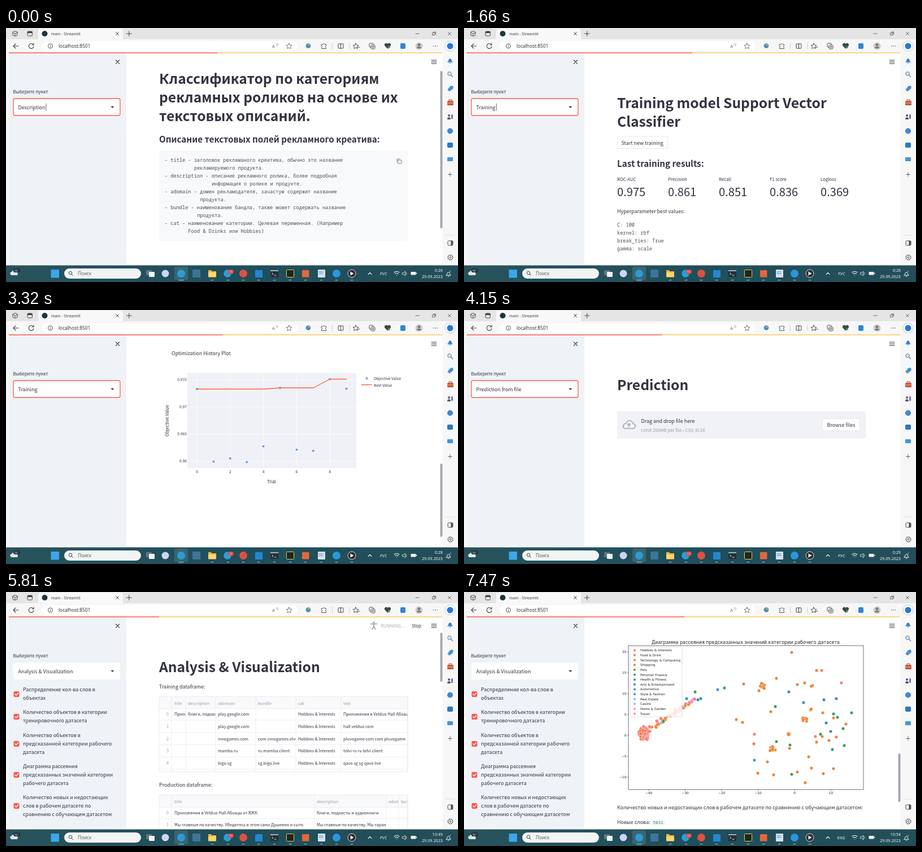
An HTML page for the animation above (8300 ms loop, 800x450 px).

```html
<!DOCTYPE html>
<html lang="ru">
<head>
<meta charset="utf-8">
<title>main</title>
<style>
html, body { margin: 0; width: 100%; height: 100%; overflow: hidden; background: #f7f7f7; }
svg { display: block; }
#stage { width: 100vw; height: 100vh; }
text { fill: #31333f; white-space: pre; }
.st { font-family: "Noto Sans CJK JP", "Noto Sans CJK SC", "Noto Sans CJK KR", "Noto Sans CJK", sans-serif; }
.ui { font-family: "Open Sans", "Noto Sans", sans-serif; }
.dj { font-family: "DejaVu Sans", sans-serif; }
.mono { font-family: "Noto Sans Mono", monospace; }
</style>
</head>
<body>
<svg id="stage" viewBox="0 0 800 450"></svg>
<script>
const STEP = 830;
const INK = '#31333f', GRAY = '#9b9da6', LINE = '#e6e8ec', RED = '#ff5a50', ORANGE = '#ee7f2f';
const FONT_SCALE = { st: .895, mono: .985 };

const esc = s => String(s).replace(/&/g, '&amp;').replace(/</g, '&lt;');
const text = (x, y, s, size = 10, { f = 'st', c = INK, w = 400, a = 'start', extra = '' } = {}) =>
  `<text class="${f}" x="${x}" y="${y}" font-size="${(size * (FONT_SCALE[f] || 1)).toFixed(2)}" font-weight="${w}" text-anchor="${a}" style="fill:${c}" ${extra}>${esc(s)}</text>`;
const rect = (x, y, w, h, fill, r = 0, extra = '') =>
  `<rect x="${x}" y="${y}" width="${w}" height="${h}" rx="${r}" fill="${fill}" ${extra}/>`;
const dot = (x, y, r, fill, extra = '') => `<circle cx="${x}" cy="${y}" r="${r}" fill="${fill}" ${extra}/>`;
const path = (d, c = '#333', w = 1, fill = 'none') =>
  `<path d="${d}" stroke="${c}" stroke-width="${w}" fill="${fill}" stroke-linecap="round" stroke-linejoin="round"/>`;
const clip = (x, y, w, h, body) =>
  `<svg x="${x}" y="${y}" width="${w}" height="${h}" viewBox="${x} ${y} ${w} ${h}">${body}</svg>`;
const lines = (rows, x, y, step, size, o) => rows.map((s, i) => text(x, y + i * step, s, size, o)).join('');
const h1 = (...rows) => lines(rows, 271, 142, 33, 27.5, { w: 700 });
const frame = (x, y, w, h, c = '#333', sw = .7) => rect(x, y, w, h, 'none', 0, `stroke="${c}" stroke-width="${sw}"`);
const upright = (x, y, s, size, f) =>
  text(0, 0, s, size, { f, a: 'middle', extra: `transform="translate(${x} ${y}) rotate(-90)"` });

let seed = 7;
const rnd = () => (seed = seed * 16807 % 2147483647) / 2147483647;
const gauss = () => (rnd() + rnd() + rnd() - 1.5) * 1.4;

function browser() {
  const icon = '#444';
  let s = rect(0, 0, 800, 450, '#f7f7f7') + rect(0, 0, 800, 20, '#e5e5e5')
    + path('M57 20V5q0-4 4-4H203q4 0 4 4V20z', 'none', 0, '#f8f8f8')
    + rect(12, 6, 8, 8, 'none', 2.5, `stroke="${icon}"`) + path('M12 8l4 2 5-2M16 10v4', icon, .8)
    + rect(38, 6, 8.5, 8, 'none', 1.5, `stroke="${icon}"`) + rect(38, 6, 8.5, 3, icon)
    + dot(68.5, 10, 5, '#20343c') + text(80, 12.5, 'main - Streamlit', 7, { f: 'ui' })
    + path('M194.500 7.500l5 5m0-5l-5 5M213.500 10h8.500m-4.200-4.200v8.500', icon)
    + path('M725 10h6M782.500 7.500l5 5m0-5l-5 5M755 8.500h4v4h-4zM756.500 7h4v4', icon, .8)
    + path('M22 32h-9m4-4l-4 4l4 4', icon, 1.1) + path('M48 29a4.400 4.400 0 1 0 1 4M49 27v3h-3', icon, 1.1)
    + rect(63, 23.5, 453, 17, '#fff', 8.5)
    + dot(78.5, 32, 4, 'none', 'stroke="#555"') + path('M78.500 31.500v2.500M78.500 29.800v.1', '#555')
    + text(93, 35, 'localhost:8501', 8.35, { f: 'ui', c: '#222' })
    + text(471, 35, 'A', 8, { f: 'ui', c: '#666' }) + path('M478 28q2 1 0 3m2-4q3 2 0 5', '#666', .6);
  const star = (x, c) => path(`M${x} 27l1.500 3.300 3.500.400-2.600 2.400.700 3.500-3.100-1.800-3.100 1.800.700-3.500-2.600-2.400 3.500-.400z`, c, .9);
  s += star(501, '#666') + dot(535, 31.5, 4.3, '#3b8fc4') + dot(536, 30, 1.8, '#e89b45')
    + path('M558.500 29h2.500q1.500-3 3 0h2.500v2.500q-3 1.500 0 3v2h-8v-2.500q3-1 0-2.500z', icon, .9)
    + path('M577.500 27v10M608 27v10', '#bbb', .7)
    + rect(588, 28, 9, 8, 'none', 1, `stroke="${icon}"`) + path('M592.500 28v8', icon)
    + star(619, icon) + path('M622 34h4', icon)
    + rect(643, 27, 7, 7, 'none', 1.5, `stroke="${icon}"`) + rect(646, 30, 7, 7, '#f7f7f7', 1.5, `stroke="${icon}"`) + path('M649.500 31.500v4m-2-2h4', icon, .8)
    + path('M675.500 36q-8-6-4-8.500q3-1 4 1q1-2 4-1q4 2.500-4 8.500z', icon, 1, '#444') + dot(678, 34, 2, '#3ba268')
    + rect(698, 27, 9, 10, '#2f86d2', 2) + dot(731, 32, 6.5, '#c9c9c9') + dot(731, 30, 2.4, '#777') + path('M727 36q0-3 4-3t4 3z', 'none', 0, '#777')
    + path('M756.500 32h.1m3.200 0h.1m3.200 0h.1', icon, 1.4);
  // right rail
  s += dot(786, 32, 9, '#fff', 'stroke="#b9cbe5"') + dot(786, 32, 5.5, '#2877d5')
    + path('M782 60q2-1 2-4q2-3 4 0q0 3 2 4zM785 62h2', '#2f7fd8', 1, '#2f7fd8')
    + dot(785, 81, 3.3, '#d5e5f2', 'stroke="#647b90"') + path('M787.500 83.500l3 3', '#647b90', 1.4)
    + path('M782 109l5-6h4v4l-6 5z', '#3d8fdd', 1, '#3d8fdd')
    + rect(781, 129, 11, 8, '#c9573e', 1.5) + path('M784 129v-2h5v2', '#9c4431') + rect(781, 132, 11, 1.5, '#ec9a58')
    + dot(784, 155, 2, '#555b70') + path('M781 162q0-4 3-4t3 4z', 'none', 0, '#555b70') + rect(788, 153, 3, 8, '#7c6bc0', 1)
    + dot(786, 182.5, 5, '#4087d4') + rect(781, 203, 10, 9, '#2879c8', 2) + rect(781, 229, 10, 7, '#3f98dc', 1)
    + path('M782.500 259.500h7m-3.500-3.500v7', '#555', .9) + path('M778 367h16', '#ddd')
    + rect(782, 377, 9, 8, 'none', 1.5, `stroke="${icon}"`) + rect(787.5, 377, 3, 8, icon)
    + dot(786.5, 406.5, 4.3, 'none', `stroke="${icon}" stroke-width="1.4" stroke-dasharray="2.3 1"`) + dot(786.5, 406.5, 1.5, 'none', `stroke="${icon}"`);
  return s;
}

function taskbar() {
  const pale = '#eef4f5';
  let s = `<linearGradient id="bar"><stop stop-color="#28535d"/><stop offset=".5" stop-color="#1f4f5b"/><stop offset="1" stop-color="#234e59"/></linearGradient>`
    + rect(0, 420.5, 800, 29.5, 'url(#bar)')
    + path('M9 438q-4-5 1-6q3-5 7 0q6 1 3 6z', 'none', 0, '#dfe7ec') + rect(13, 426, 12, 7, '#20323a', 3) + text(14.5, 431.5, '16°', 5, { f: 'ui', c: '#fff' })
    + rect(79.5, 428, 14.5, 14.5, '#3ba7ea', 1)
    + rect(103, 426, 136, 18, '#f0f4f5', 9) + dot(114, 434, 2.8, 'none', 'stroke="#444"') + path('M116 436l2.500 2.500', '#444')
    + text(127, 438, 'Поиск', 8.2, { f: 'ui', c: '#555' })
    + rect(248, 429, 10, 9, '#66757c', 1) + rect(253, 432, 10, 9, '#eef1f2', 1)
    + dot(282, 435, 6.5, '#cdd5f3')
    + rect(298, 422.5, 24, 24, '#3a6570', 3) + dot(310, 435, 7, '#2c9bd5') + rect(305, 446, 10, 1.5, '#54bde5', .7)
    + rect(330, 428, 14, 14, '#3d7598', 1)
    + path('M358 429h5l1.500 2H372v10h-14z', 'none', 0, '#f0b53c') + rect(358, 433, 14, 8.5, '#ffd668', 1)
    + dot(392, 435, 6.7, '#2b9fdc') + rect(393, 428, 10, 7.5, '#e0483f', 3.7) + text(398, 433.8, '11', 5.5, { f: 'ui', c: '#fff', a: 'middle' })
    + dot(420, 435, 7, '#df513f') + rect(441, 429, 13, 13, '#2586d0', 1)
    + rect(468, 429, 14, 12, '#242f3b', 1) + rect(468, 429, 14, 2, '#a6b1ba') + path('M471 434l2 1.500-2 1.500m4 1h3', pale, .9)
    + rect(496.5, 428.5, 13, 13, '#1f251f', 1, 'stroke="#d9d456"')
    + rect(524, 429, 12.5, 12.5, '#e4673c', 1) + rect(552, 428, 13, 14, '#d4e2f4', 1) + path('M554 432h7m-7 3h7', '#597fb9')
    + dot(585, 435, 7, '#2997df') + dot(612, 435, 7, '#2b2d3a', 'stroke="#f1d8cf"') + path('M610 432l5 3-5 3z', '#fff', .5, '#fff');
  for (const x of [365, 393, 420, 447, 475, 503, 530, 558, 585, 612]) s += rect(x - 2.5, 446, 5, 1.3, '#9aacb2', .6);
  s += path('M641 436.500l3-3 3 3', pale, 1.1)
    + path('M687 433q4.500-3.500 9 0M688.800 435.500q2.700-2 5.400 0M691.500 438v.1', pale, 1.2)
    + path('M702 433.500h2l2.500-2.500v8l-2.500-2.500h-2zM708.500 433q1.500 2 0 4', pale, .8)
    + rect(716.5, 432, 9, 5.5, pale, 1) + rect(726, 433.5, 1.2, 2.5, pale)
    + path('M779 438q2-1 2-4q2-3 4 0q0 3 2 4zM782 440h2', pale, 1) + text(785, 432.5, 'z', 5, { f: 'ui', c: pale });
  return s;
}

function description() {
  const rows = [[0, '- title - заголовок рекламаного креатива, обычно это название'], [10, 'рекламируемого продукта.'],
    [0, '- description - описание рекламного ролика, более подробная'], [16, 'информация о ролике и продукте.'],
    [0, '- adomain - домен рекламодателя, зачастую содержит название'], [12, 'продукта.'],
    [0, '- bundle - наименование бандла, также может содержать название'], [11, 'продукта.'],
    [0, '- cat - наименование категории. Целевая переменная. (Например'], [8, 'Food & Drinks или Hobbies)']];
  return lines(['Классификатор по категориям', 'рекламных роликов на основе их', 'текстовых описаний.'], 271, 98.5, 33, 27.5, { w: 700 })
    + text(271, 203, 'Описание текстовых полей рекламного креатива:', 17, { w: 600 })
    + rect(271, 217, 440, 160, '#f8f9fb', 3)
    + rows.map(([n, s], i) => text(281 + n * 5.2, 237 + i * 14, s, 8.75, { f: 'mono', c: '#4b4d58' })).join('')
    + path('M692 237v-5h5M694 234h6v6h-6z', '#777', .9);
}

function plot() {
  let s = text(293, 80, 'Optimization History Plot') + rect(321, 111.5, 299, 168.5, '#eff1f6');
  for (let i = 0; i < 5; i++) {
    const x = 338 + i * 58.8;
    s += path(`M${x} 111.500V280`, '#fff', .7) + text(x, 289, i * 2, 7.5, { a: 'middle' });
  }
  ['0.975', '0.97', '0.965', '0.96'].forEach((v, i) => {
    const y = 123.5 + i * 48.1;
    s += path(`M321 ${y}H620`, '#fff', .7) + text(320, y + 2.6, v, 7.5, { a: 'end' });
  });
  const best = '#ff5f49', blue = '#6a9fea';
  [140, 268.5, 263, 269.5, 241.5, 138, 247.5, 249.5, 122.5, 139.5].forEach((y, i) => s += dot(338 + i * 29.4, y, 2, blue));
  return s + path('M338 140H456L485 138H544L573 122.500H602.500', best, 1.4)
    + text(470, 306.5, 'Trial', 8.75, { a: 'middle' }) + upright(288, 196, 'Objective Value', 8.75, 'st')
    + dot(638.5, 121, 2, blue) + text(651, 124, 'Objective Value', 7.5)
    + path('M629.500 132.500h18', best, 1.4) + text(651, 135.5, 'Best Value', 7.5);
}

function training() {
  const metrics = { 'ROC-AUC': '0.975', Precision: '0.861', Recall: '0.851', 'F1 score': '0.836', Logloss: '0.369' };
  return h1('Training model Support Vector', 'Classifier')
    + rect(271, 192, 89.5, 21.5, '#fff', 1.5, 'stroke="#dcdde1" stroke-width=".7"') + text(278.5, 206.5, 'Start new training')
    + text(271, 246, 'Last training results:', 17, { w: 600 })
    + Object.entries(metrics).map(([k, v], i) => text(271 + i * 90, 271, k, 8.75) + text(271 + i * 90, 298, v, 22.5)).join('')
    + text(271, 327.5, 'Hyperparameter best values:')
    + lines(['C: 100', 'kernel: rbf', 'break_ties: True', 'gamma: scale'], 271, 352, 14, 8.75, { f: 'mono', c: '#4b4d58' });
}

// cols: left edges, the last one is the right edge; rows: cells after the index
function table(y, height, cols, heads, rows, inset = [5, 4, 4, 4, 4, 4]) {
  const right = cols.at(-1), first = y + 31;
  let s = rect(271, y, right - 271, 22, '#f8f9fb');
  const cell = (c, base, v, color) => v
    ? clip(cols[c], base - 10, cols[c + 1] - cols[c], 14, text(cols[c] + inset[c], base, v, 8.125, { c: color })) : '';
  heads.forEach((v, c) => s += cell(c, y + 14.5, v, GRAY));
  rows.forEach((row, r) => {
    const mid = first + r * 21.75;
    s += text(288, mid + 3, r, 8.125, { c: GRAY, a: 'end' }) + path(`M271 ${mid + 11}H${right}`, LINE, .7);
    row.forEach((v, c) => s += cell(c, mid + 3, v, INK));
  });
  cols.forEach(x => s += path(`M${x} ${y}V${y + height}`, LINE, .7));
  return s + path(`M271 ${y + 22}H${right}`, LINE, .7) + frame(271, y, right - 271, height, LINE, .8);
}

const books = 'Книги, подкасты и аудиокниги', quality = 'Мы главные по качеству.', hob = 'Hobbies & Interests';

function uploader() {
  return h1('Prediction') + rect(271, 179, 440, 48.5, '#f0f2f6', 3)
    + path('M285 210q-4-1-3-5t5-4q2-5 6-5t6 5q5 1 4 6q-1 3-4 3zM292 207v-6m-2.500 2.500l2.500-2.500 2.500 2.500', '#a3a8b8', 1.7)
    + text(313.5, 200, 'Drag and drop file here') + text(313.5, 215.5, 'Limit 200MB per file • CSV, XLSX', 8.75, { c: GRAY })
    + rect(634.5, 192.5, 66, 21.5, '#fff', 2, 'stroke="#dfe0e4" stroke-width=".7"') + text(667.5, 206.8, 'Browse files', 10, { a: 'middle' });
}

function prediction() {
  return uploader() + text(271, 249, 'Last prediction results:')
    + table(264, 134, [293, 455, 582, 604, 626, 708], ['', 'description', 'adomain', 'bundle', 'predict'], [
      ['Hall Абзацы от ВЖК', books, '', '', hob],
      ['ву. Убедитесь в этом сами Душевно и сыто', quality + ' Мы гарантируем', '', '', 'Food & Drink'],
      ['elduo Hall', 'Pizza delivery takeaway', '', '', hob],
      ['а продуктов на дом, купить продукты питания', 'pageMetaDescription', '', '', 'Food & Drink'],
      ['оставка продуктов', 'Читайте отзывы, сравнивайте обзоры', '', '', 'Food & Drink']], [0, 4, 5, 5, 5])
    + '<linearGradient id="shade"><stop stop-color="#888" stop-opacity=".4"/><stop offset="1" stop-color="#888" stop-opacity="0"/></linearGradient>'
    + rect(293, 264, 6, 130, 'url(#shade)');
}

function dataframes() {
  const app = 'Приложения в Velduo Hall Абзацы от ВЖК';
  return h1('Analysis & Visualization') + text(271, 170.5, 'Training dataframe:')
    + table(185, 133.5, [293, 318, 371, 442, 513, 593, 711], ['title', 'description', 'adomain', 'bundle', 'cat', 'text'], [
      [app, books, 'play.google.com', '', hob, app],
      ['', '', 'play.google.com', '', hob, 'hall velduo com'],
      ['', '', 'innogames.com', 'com.innogames.elvenar', hob, 'pluvogame com com pluvogame'],
      ['', '', 'mamba.ru', 'ru.mamba.client', hob, 'tolvi ru ru tolvi client'],
      ['', '', 'bigo.sg', 'sg.bigo.live', hob, 'qavo sg sg qavo live']])
    + text(271, 344.5, 'Production dataframe:')
    + table(359.5, 100, [293, 546, 673, 695, 711], ['title', 'description', 'adomain', 'bundle'], [
      [app, books], [quality + ' Убедитесь в этом сами Душевно и сыто', quality + ' Мы гарантируем']]);
}

function charts() {
  const dj = { f: 'dj', c: '#222' }, mid = { ...dj, a: 'middle' }, end = { ...dj, a: 'end' };
  let s = text(501, 80, 'Распределение кол-ва слов в объектах', 6.94, mid);
  const counts = [240, 128, 240, 345, 673, 370, 140, 108, 104, 56, 30, 12, 4, 2, 6, 3, 1, 5, 2];
  counts.forEach((n, i) => s += rect(313 + i * 9.45, 274 - n * .27, 9.55, n * .27, '#1f77b4'));
  s += rect(661, 273.2, 9.5, .8, '#1f77b4') + frame(294, 83, 414, 191);
  for (let i = 0; i < 8; i++) {
    const x = 311 + i * 52.75, y = 274 - i * 27;
    s += path(`M${x} 274v2M294 ${y}h-2`, '#333', .6) + text(x, 282, i * 25, 5.3, mid) + text(291, y + 2, i * 100, 5.3, end);
  }
  s += upright(278.5, 178.5, 'Кол-во объектов', 4.9, 'dj') + text(501, 289, 'Кол-во слов в объекте', 4.8, mid)
    + path('M727 79l-3-3m0 2.500v-2.500h2.500M729 81l3 3m0-2.500v2.500h-2.500', '#777', 1)
    + text(532, 313, 'Количество объектов в категории тренировочного датасета', 8.32, mid);
  [[hob, 48.9, '#e994a4'], ['Personal Finance', 9.7, '#eb946a'], ['Food & Drink', 9.6, '#c3973f'], ['Arts & Entertainment', 7.1, '#a5a047'],
    ['Health & Fitness', 6.5, '#83a84c'], ['Technology & Computing', 4.4, '#4fae50'], ['Shopping', 2.6, '#4ba69f'],
    ['Casino', 2.3, '#4aa4ad'], ['Style & Fashion', 2.1, '#4ba2b6']].forEach(([name, v, c], i) => {
    const y = 321 + i * 11.55;
    s += rect(357, y - 4.65, v * 6.81, 9.3, c) + path(`M357 ${y}h-2`, '#333', .6)
      + text(354, y + 2.2, name, 5.78, end) + text(358 + v * 6.81, y + 2.2, v + '%', 5.8, dj);
  });
  return s + frame(357, 315, 351, 140) + upright(279.5, 396.5, 'Категория', 5.8, 'dj');
}

function scatter() {
  const PINK = '#fb7672', GREEN = '#359a55', TEAL = '#2f8fa6', BLUE = '#3f8fe0';
  const dj = { f: 'dj', c: '#222' };
  const mark = (x, y, c) => dot(x.toFixed(1), y.toFixed(1), 2.7, c, 'stroke="#fff" stroke-width=".4"');
  const pick = list => list[Math.floor(rnd() * list.length)];
  let s = text(498.5, 92, 'Диаграмма рассеяния предсказанных значений категории рабочего датасета', 8, { ...dj, a: 'middle' });
  for (let i = 0; i < 70; i++) {
    const t = rnd() ** 1.5;
    s += mark(322 + t * 86 + gauss() * 2, 247 - t * 57 + gauss() * 4 * (1.2 - t), pick([PINK, PINK, ORANGE, ORANGE, '#c9a0e8']));
  }
  for (let i = 0; i < 110; i++) s += mark(318.5 + gauss() * 5, 250 + gauss() * 6.5, pick([PINK, PINK, PINK, PINK, PINK, ORANGE]));
  for (const [x, y, n, spread] of [[529, 166, 9, 3], [546, 278, 12, 3], [601, 227, 8, 3], [575, 252, 4, 2], [613, 207, 3, 2.5], [615, 167, 2, 1.5]])
    for (let i = 0; i < n; i++) s += mark(x + gauss() * spread, y + gauss() * spread, ORANGE);
  const groups = [
    [ORANGE, [580, 107, 495, 163, 553, 153, 590, 164, 603, 161, 624, 139, 482, 226, 493, 231, 543, 212, 635, 214, 676, 234,
      513, 269, 537, 301, 520, 321, 548, 324, 590, 319, 604, 338, 615, 312, 610, 292, 636, 322, 654, 313, 624, 266, 646, 263,
      659, 257, 654, 223, 576, 277, 522, 175, 634, 256]],
    [PINK, [633, 139, 668, 161, 514, 252, 622, 256]],
    [GREEN, [409, 177, 551, 203, 654, 216, 661, 222, 686, 214, 553, 265, 577, 271, 580, 323, 673, 272, 631, 252, 671, 242, 353, 229]],
    [TEAL, [461, 170, 575, 177, 601, 196, 637, 191, 659, 189, 641, 232, 649, 247, 652, 279, 419, 189, 394, 189, 414, 191]],
    [BLUE, [449, 173, 514, 298]]];
  for (const [c, p] of groups) for (let i = 0; i < p.length; i += 2) s += mark(p[i], p[i + 1], c);
  s += rect(294, 97.5, 92, 123.5, '#fff', 1.5, 'fill-opacity=".8" stroke="#ccc" stroke-width=".6"');
  [[hob, PINK], ['Food & Drink', ORANGE], ['Technology & Computing', ORANGE], ['Shopping', '#dd8a2c'], ['Pets', '#5a9a3a'],
    ['Personal Finance', GREEN], ['Health & Fitness', TEAL], ['Arts & Entertainment', '#2c90b0'], ['Automotive', '#2f90b8'],
    ['Style & Fashion', BLUE], ['Real Estate', '#7ab5f5'], ['Casino', '#c9a0f0'], ['Home & Garden', '#ff8f98'], ['Travel', '#fb8a88']]
    .forEach(([name, c], i) => s += dot(302, 103.3 + i * 8.64, 2, c) + text(312, 105.3 + i * 8.64, name, 5.7, dj));
  s += frame(291, 95, 416, 255);
  for (let v = -10; v <= 20; v += 5) {
    const y = 254 - v * 7.4;
    s += path(`M291 ${y}h-2`, '#333', .6) + text(287.5, y + 2.1, String(v).replace('-', '−'), 5.8, { ...dj, a: 'end' });
  }
  for (let v = -40; v <= 10; v += 10) {
    const x = 585 + v * 6.45;
    s += path(`M${x} 350v2`, '#333', .6) + text(x, 358, String(v).replace('-', '−'), 5.8, { ...dj, a: 'middle' });
  }
  return s + text(271, 384.5, 'Количество новых и недостающих слов в рабочем датасете по сравнению с обучающим датасетом:')
    + text(271, 411, 'Новые слова:') + rect(331, 402, 25, 13, '#f6f8f9', 2) + text(334, 411, '5032', 7.9, { f: 'mono', c: '#2f8a5b' });
}

function checkboxes() {
  return [[180, ['Распределение кол-ва слов в', 'объектах']], [220, ['Количество объектов в категории', 'тренировочного датасета']],
    [268, ['Количество объектов в', 'предсказанной категории рабочего', 'датасета']],
    [323, ['Диаграмма рассеяния', 'предсказанных значений категории', 'рабочего датасета']],
    [378, ['Количество новых и недостающих', 'слов в рабочем датасете по', 'сравнению с обучающим датасетом']]]
    .map(([y, rows]) => rect(13.5, y - 4, 10, 10, '#fb5650', 2) + path(`M16 ${y + 1}l2 2 3.500-4`, '#fff', 1.3)
      + lines(rows, 30, y + 11 - rows.length * 7.5, 15, 10)).join('');
}

const RUNNER = 'M651 56v5l-3 5m3-5l3 5M645.500 56.500h11', SWIMMER = 'M646 56l5-1 4 4M645 62q2-2 4 0t4 0 4 0M645 65q2-2 4 0t4 0 4 0';
const ANALYSIS = 'Analysis & Visualization';
const trainingPage = training();
const scenes = [
  { menu: 'Description', caret: 71, body: description(), thumb: [76, 355], split: 374, time: '0:26' },
  { menu: 'Description', body: description(), scroll: 62, thumb: [124, 403], split: 374, time: '0:26' },
  { menu: 'Training', caret: 57.5, body: trainingPage, split: 404, time: '0:28' },
  { menu: 'Training', body: trainingPage + `<g transform="translate(0 565)">${plot()}</g>`, scroll: 280, thumb: [170, 300], split: 390, time: '0:28' },
  { menu: 'Training', body: plot(), thumb: [272, 402], split: 383, time: '0:28' },
  { menu: 'Prediction from file', body: uploader(), split: 350, time: '0:29' },
  { menu: 'Prediction from file', body: prediction(), thumb: [72, 333], split: 331, time: '0:29' },
  { menu: ANALYSIS, body: dataframes(), thumb: [72, 159], split: 271, time: '10:49', run: RUNNER },
  { menu: ANALYSIS, body: charts(), thumb: [178, 292], split: 370, time: '10:50', run: SWIMMER, lang: 'ENG' },
  { menu: ANALYSIS, body: scatter(), thumb: [286, 372], split: 390, time: '10:54', lang: 'ENG' },
];

function scene({ menu, caret, body, scroll = 0, thumb, split, time, run, lang = 'РУС' }) {
  const analysis = menu === ANALYSIS, tray = { f: 'ui', c: '#fff', a: 'end' };
  return '<g class="scene" visibility="hidden">'
    + rect(5, 43, 767.5, 375, '#fff', 3) + rect(5, 43, 208, 375, '#eff2f6', 3)
    + clip(213, 45, 555, 373, `<g transform="translate(0 ${-scroll})">${body}</g>` + (scroll ? rect(213, 45, 555, 28, '#fff') : ''))
    + rect(5, 43.3, split - 5, 1.5, RED) + rect(split, 43.3, 772 - split, 1.5, '#f9ca67')
    + path('M194.500 57l6 6m0-6l-6 6', INK, 1.1) + text(12.5, 115.5, 'Выберите пункт', 8.75)
    + rect(13, 125, 189, 30, '#fff', 3, analysis ? '' : `stroke="${RED}" stroke-width="1.3"`)
    + text(21.5, 143.5, menu) + (caret ? path(`M${caret} 134v12`, INK, .7) : '') + path('M186 139h5l-2.500 2.500z', INK, .5, INK)
    + (analysis ? checkboxes() : '') + path('M753 57h9m-9 3h9m-9 3h9', INK, 1.1)
    + (run ? path(run, GRAY, 1.6) + dot(run === RUNNER ? 651 : 655, 54, 1.6, GRAY) + text(663.5, 62.8, 'RUNNING...', 8.75, { c: '#a9abb3' }) + text(718, 63, 'Stop', 8.75) : '')
    + (thumb ? rect(768.5, thumb[0], 4, thumb[1] - thumb[0], '#a4a8b0', 2) : '')
    + text(674.5, 437.8, lang, 6.8, tray) + text(773, 432.3, time, 7.25, tray) + text(773, 443, '29.09.2023', 7.25, tray)
    + '</g>';
}

document.getElementById('stage').innerHTML = browser() + taskbar() + scenes.map(scene).join('');
const layers = document.querySelectorAll('.scene');
function tick() {
  const now = Math.floor(performance.now() / STEP) % layers.length;
  layers.forEach((el, i) => el.setAttribute('visibility', i === now ? 'visible' : 'hidden'));
  requestAnimationFrame(tick);
}
tick();
</script>
</body>
</html>
```
